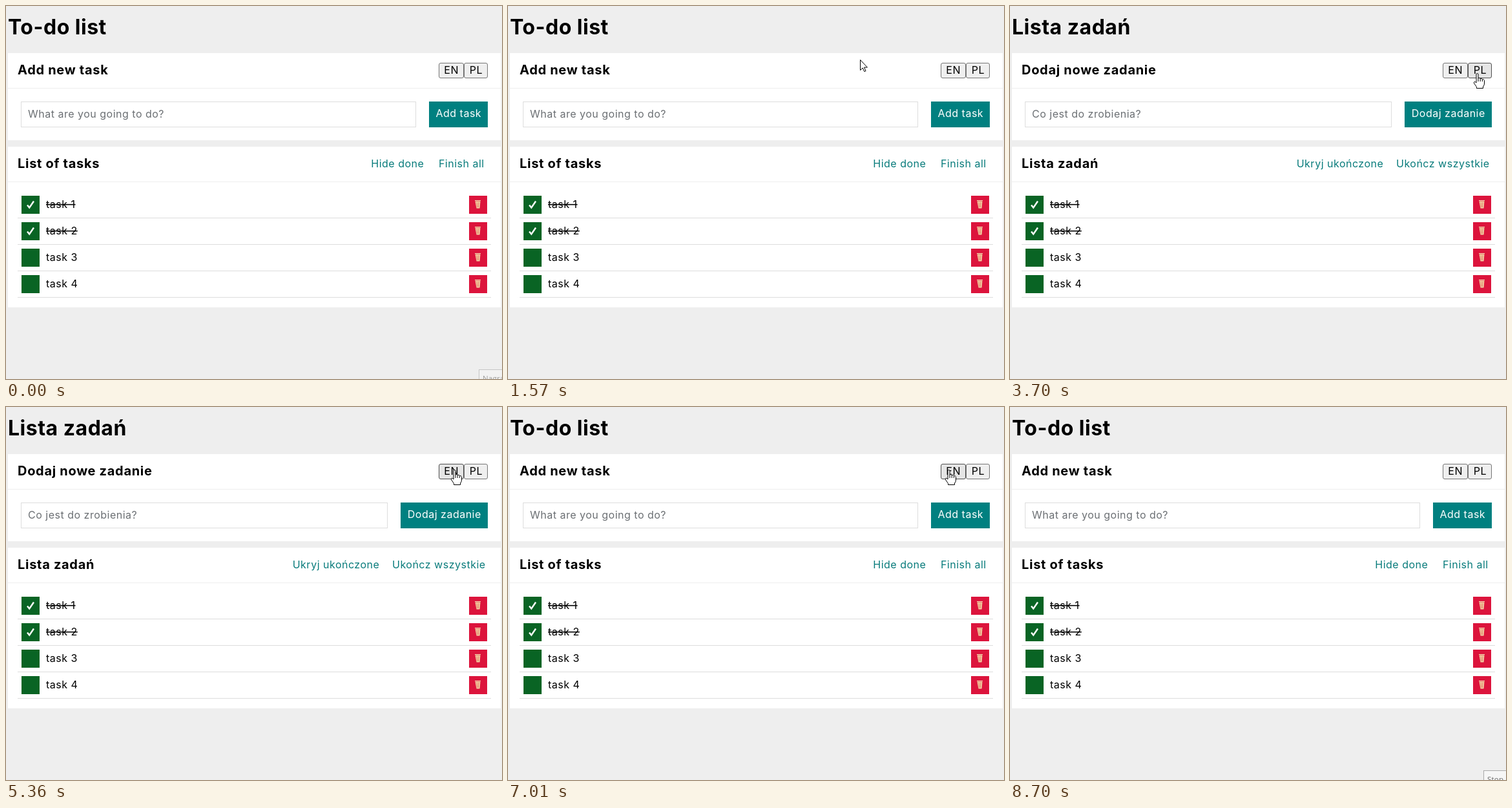
An HTML page that plays this animation: 768 by 578 pixels, repeating every 8.77 s.

```html
<!DOCTYPE html>
<html lang="en">
<head>
<meta charset="utf-8">
<title>To-do list</title>
<style>
  html, body { margin: 0; width: 100%; height: 100%; overflow: hidden; background: #eee; }
  svg { display: block; width: 768px; height: 578px; }
  text { font: 400 16px Inter, "Open Sans", sans-serif; letter-spacing: .5px; white-space: pre; }
  .title { font-size: 32px; font-weight: 700; }
  .head { font-size: 20px; font-weight: 700; letter-spacing: .7px; }
  .mid { text-anchor: middle; }
  .link { fill: #087b7b; }
  .hint { fill: #6b6f73; }
  .done { text-decoration: line-through; }
  .panel { fill: #fff; }
  .rule { stroke: #eee; }
  .row-rule { stroke: #ddd; }
  .field { fill: #fff; stroke: #ddd; }
  .add { fill: #008080; }
  .on-add { fill: #fff; }
  .lang { fill: #efefef; stroke: #767676; }
  .lang.hover { fill: #e5e5e5; stroke: #4f4f4f; }
  .lang.active { fill: #f5f5f5; stroke: #8d8d8d; }
  .tip rect { fill: #f6f6f6; stroke: #aaa; }
  .tip text { font: 11.5px "Open Sans", sans-serif; letter-spacing: .2px; fill: #666; }
  .pointer { fill: #fff; stroke: #000; stroke-linejoin: round; }
</style>
</head>
<body>
<svg viewBox="0 0 768 578">
  <defs>
    <g id="row">
      <rect x="24" y="294" width="28" height="28" fill="#096424"/>
      <rect x="717" y="294" width="28" height="28" fill="#dc143c"/>
      <path d="M726.5 302.5h8l-1 11h-5z" fill="#f3d3a5"/>
      <path d="M726 302h9M729 304l.7 8M732 304l-.5 8" fill="none" stroke="#dc5a50" stroke-width=".8"/>
      <path d="M726 301.5h9" stroke="#f7dfb8"/>
      <path class="row-rule" d="M18 328.5H751"/>
    </g>
    <path id="check" d="M33 308.5L36.2 312.5L43 302.5" fill="none" stroke="#fff" stroke-width="2.4"/>
  </defs>

  <rect width="768" height="578" fill="#eee"/>
  <rect class="panel" x="3" y="73" width="763" height="135"/>
  <rect class="panel" x="3" y="218" width="763" height="249"/>
  <path class="rule" d="M3 127.5H766M3 272.5H766"/>

  <rect class="lang" id="btnEn" x="670.5" y="88.5" width="38" height="23" rx="2.5"/>
  <rect class="lang" id="btnPl" x="709.5" y="88.5" width="36" height="23" rx="2.5"/>
  <text class="mid" x="689.7" y="105">EN</text>
  <text class="mid" x="728" y="105">PL</text>

  <g id="en">
    <text class="title" x="3" y="44">To-do list</text>
    <text class="head" x="18" y="106">Add new task</text>
    <rect class="field" x="23.5" y="148.5" width="611" height="39"/>
    <text class="hint" x="34" y="173">What are you going to do?</text>
    <rect class="add" x="655" y="148" width="91" height="40"/>
    <text class="mid on-add" x="700.8" y="172">Add task</text>
    <text class="head" x="18" y="251">List of tasks</text>
    <text class="mid link" x="606.3" y="250">Hide done</text>
    <text class="mid link" x="705.3" y="250">Finish all</text>
  </g>
  <g id="pl">
    <text class="title" x="3" y="44">Lista zadań</text>
    <text class="head" x="18" y="106">Dodaj nowe zadanie</text>
    <rect class="field" x="23.5" y="148.5" width="567" height="39"/>
    <text class="hint" x="34" y="173">Co jest do zrobienia?</text>
    <rect class="add" x="611" y="148" width="135" height="40"/>
    <text class="mid on-add" x="678.8" y="172">Dodaj zadanie</text>
    <text class="head" x="18" y="251">Lista zadań</text>
    <text class="mid link" x="511" y="250">Ukryj ukończone</text>
    <text class="mid link" x="670.3" y="250">Ukończ wszystkie</text>
  </g>

  <use href="#row"/><use href="#check"/>
  <use href="#row" y="41"/><use href="#check" y="41"/>
  <use href="#row" y="82"/>
  <use href="#row" y="123"/>
  <text class="done" x="62" y="313">task 1</text>
  <text class="done" x="62" y="354">task 2</text>
  <text x="62" y="395">task 3</text>
  <text x="62" y="436">task 4</text>

  <g class="tip" id="tipRecord" opacity=".6">
    <rect x="732.5" y="563.5" width="60" height="30"/>
    <text x="738" y="581">Nagraj</text>
  </g>
  <g class="tip" id="tipStop">
    <rect x="733.5" y="563.5" width="60" height="30"/>
    <text x="739" y="581">Stop</text>
  </g>

  <g id="cursor">
    <path class="pointer" id="arrow" d="M.5 .5V16.5L4.2 13L6.8 18.6L9 17.6L6.5 12.1H11.4Z"/>
    <path class="pointer" id="hand" d="M-2 15V2Q-2 .5-.5 .5T1 2V8.5Q1.3 7 2.7 7.3T4.2 9.2Q5 7.9 6.2 8.4T7.4 10.2Q8.2 9.2 9.3 9.8T10.5 11.6V16Q10.5 19 8.5 21V23.5H-1.5V21.5L-5.3 16Q-6.2 14-5 13.4T-2 15ZM1 8.5V13M4.2 9.2V13M7.4 10.2V13"/>
    <path id="beam" d="M-3 -8H3M0 -8V8M-3 8H3" fill="none" stroke="#000"/>
  </g>
</svg>
<script>
const LOOP = 8770;
const $ = id => document.getElementById(id);
const show = (id, on) => { $(id).style.display = on ? "" : "none"; };

// Each move: first and last step time, step count, Bezier points, easing.
const easeOut = u => 1 - (1 - u) ** 1.6;
const moves = [
  { from: 460, to: 1300, steps: 13, path: [[726, 590], [530, 420], [470, 200], [514, 88]], ease: easeOut },
  { from: 1370, to: 1710, steps: 6, path: [[514, 88], [561, 80]] },
  { from: 2040, to: 2110, steps: 2, path: [[561, 80], [568, 80]] },
  { from: 2390, to: 2670, steps: 5, path: [[568, 80], [640, 88], [713, 97]] },
  { from: 2930, to: 3000, steps: 2, path: [[713, 97], [724, 104]] },
  { from: 4970, to: 5360, steps: 7, path: [[724, 104], [712, 109], [695, 97]] },
  { from: 5620, to: 5750, steps: 3, path: [[695, 97], [687, 97]] },
  { from: 7010, to: 7880, steps: 14, path: [[687, 97], [560, 100], [480, 330], [707, 530]], ease: u => u ** 1.7 },
  { from: 7950, to: 8150, steps: 4, path: [[707, 530], [724, 580]] }
];

const mix = (a, b, u) => a.map((v, i) => v + (b[i] - v) * u);
function bezier(points, u) {
  while (points.length > 1) points = points.slice(1).map((p, i) => mix(points[i], p, u));
  return points[0];
}

function cursorAt(t) {
  const move = moves.filter(m => m.from <= t).pop();
  if (!move) return [800, 600];
  const { from, to, steps, path, ease = u => u } = move;
  const step = Math.floor((t - from) / (to - from) * (steps - 1) + 0.1) + 1;
  return bezier(path, ease(Math.min(1, step / steps)));
}

const inside = ([x, y], left, top, right, bottom) =>
  x >= left && x < right && y >= top && y < bottom;

function draw(t) {
  const polish = t >= 3700 && t < 6400;
  const pos = cursorAt(t);
  const overEn = inside(pos, 670, 88, 709, 112);
  const overPl = inside(pos, 709, 88, 746, 112);
  const overLink = inside(pos, 565, 235, 648, 254) || inside(pos, 670, 235, 740, 254);
  const overAdd = inside(pos, polish ? 611 : 655, 148, 746, 188);
  const overField = inside(pos, 23, 148, polish ? 591 : 635, 188);
  const hand = overEn || overPl || overLink || overAdd;

  show("en", !polish);
  show("pl", polish);
  $("btnEn").classList.toggle("hover", overEn);
  $("btnPl").classList.toggle("hover", overPl);
  $("btnEn").classList.toggle("active", t >= 6270 && t < 6400);
  $("btnPl").classList.toggle("active", t >= 3560 && t < 3700);

  show("hand", hand);
  show("beam", overField);
  show("arrow", !hand && !overField);
  $("cursor").setAttribute("transform", `translate(${pos.map(Math.round)})`);

  show("tipRecord", t < 70);
  show("tipStop", t >= 8630);
  $("tipStop").setAttribute("opacity", t < 8700 ? 0.5 : 1);
}

const start = performance.now();
function tick() {
  draw((performance.now() - start) % LOOP);
  requestAnimationFrame(tick);
}
tick();
</script>
</body>
</html>
```
